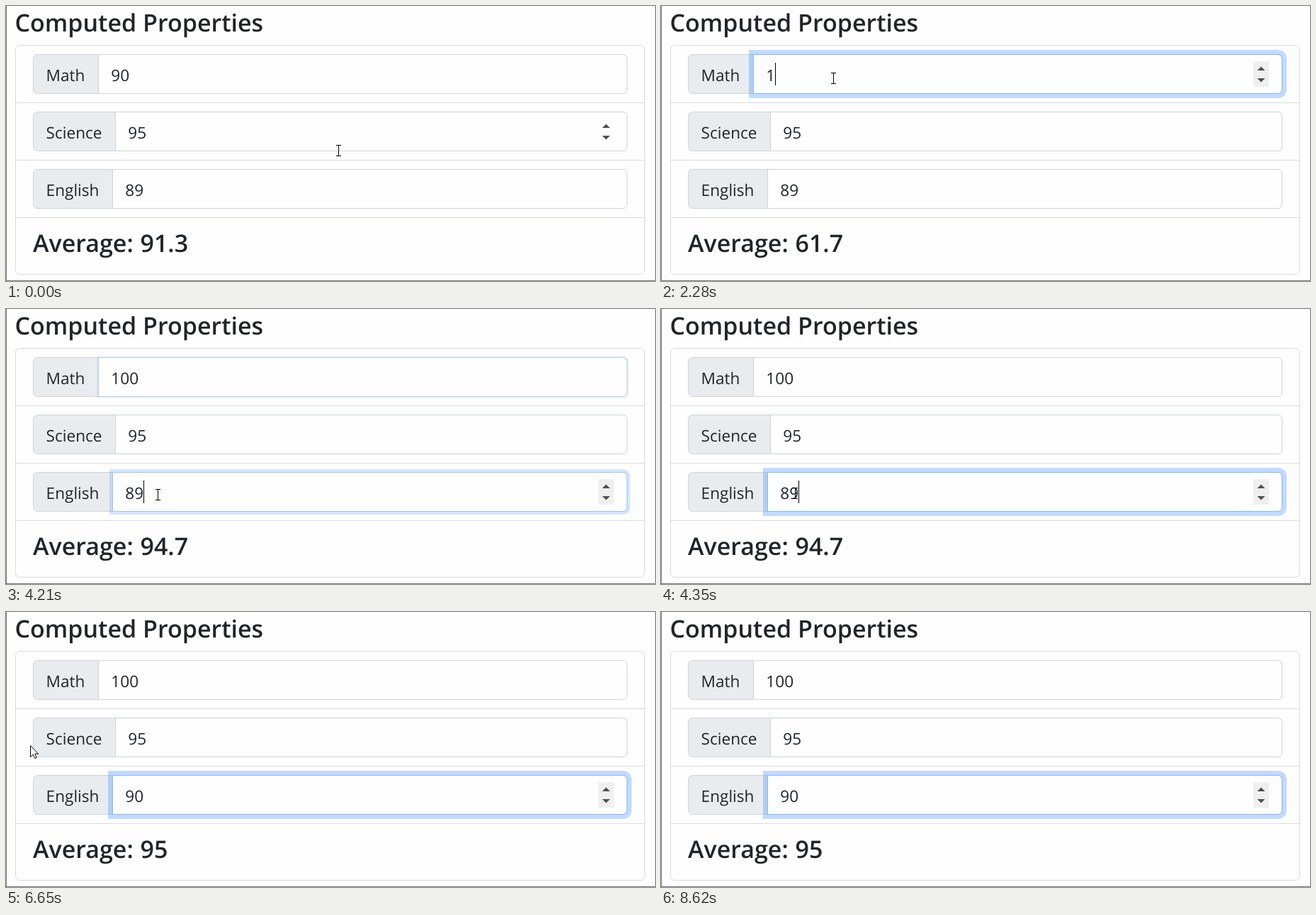
An HTML page that plays this animation: 916 px wide and 388 px high, repeating every 8740 ms.

```html
<!DOCTYPE html>
<html lang="en">
<head>
<meta charset="utf-8">
<title>Computed Properties</title>
<style>
  html, body { margin: 0; width: 100%; height: 100%; overflow: hidden; background: #fefefe; }
  svg { display: block; }
  text { font: 400 22.6px "Open Sans", "Noto Sans", sans-serif; fill: #212529; text-rendering: geometricPrecision; }
  .heading { font-size: 34px; font-weight: 600; }
  .line { fill: none; stroke: #dadada; }
  .addon { fill: #e9ecef; stroke: #ced4da; }
  .input { fill: #fefefe; stroke: #ced4da; }
  .active { fill: none; stroke: #86b7fe; }
  .ring { fill: #0d6efd; }
  .selection { fill: #3067d6; }
  .spin { fill: #efefef; }
  .arrows { fill: #505050; }
  .caret, .spin, #beam { shape-rendering: crispEdges; }
  #beam { fill: none; stroke: #000; }
  #pointer { fill: #fff; stroke: #000; }
</style>
</head>
<body>
<svg width="916" height="388" viewBox="0 0 916 388">
  <path d="M.5 0V388M0 387.5H916" stroke="#777"/>
  <text class="heading" x="12.5" y="36">Computed Properties</text>
  <rect class="line" x="13.5" y="55.5" width="888" height="323" rx="6"/>
  <path class="line" d="M14 136.5H901M14 217.5H901M14 298.5H901"/>
  <g id="fields"></g>
  <text class="heading" x="38" y="347">Average:</text>
  <text class="heading" id="average" x="189.5" y="347"></text>
  <path id="beam" d="M-3 -7.5H4M.5 -7V7M-3 7.5H4"/>
  <path id="pointer" d="M.5 .7V16.6L4.2 13.1 6.7 18.5 9.1 17.4 6.7 12.1H11.6Z"/>
</svg>
<script>
const LOOP = 8740, STEP = 120, BLINK = 490, TRANSITION = 150;
const RIGHT = 877, HEIGHT = 56, DIGIT = 12.94, PADDING = 18.3;
const byId = id => document.getElementById(id);

const cursorStart = { x: 469, y: 204 };
const moves = [
  { at: 120, steps: 3, x: 421, y: 138 },
  { at: 500, steps: 6, x: 243, y: 102 },
  { at: 3190, steps: 7, x: 214, y: 262 },
  { at: 4350, steps: 2, x: 163, y: 258, drag: true },
  { at: 4630, steps: 5, x: 34, y: 188, drag: true },
  { at: 7160, steps: 8, x: 598, y: 331 },
  { at: 8140, steps: 5, x: 920, y: 400 }
];

// Typing starts by replacing a selection; keys holds the time of each typed digit.
const fields = [
  { label: "Math", left: 130, initial: "90", typed: "100",
    focus: 980, blur: 4110, select: 2150, keys: [2280, 2560, 2690] },
  { label: "Science", left: 154, initial: "95", typed: "",
    focus: Infinity, blur: Infinity, select: Infinity, keys: [] },
  { label: "English", left: 150, initial: "89", typed: "90",
    focus: 4110, blur: Infinity, select: 4480, keys: [5900, 6150] }
];

const ramp = elapsed => Math.max(0, Math.min(1, elapsed / TRANSITION));
const show = (el, on) => el.setAttribute("visibility", on ? "visible" : "hidden");

// Box with square left corners and rounded right corners, grown by a margin.
function inputShape({ left, top }, grow, radius) {
  const x = left - grow, y = top - grow;
  const right = RIGHT + grow, bottom = top + HEIGHT + grow;
  return `M${x} ${y}H${right - radius}a${radius} ${radius} 0 0 1 ${radius} ${radius}` +
    `V${bottom - radius}a${radius} ${radius} 0 0 1 ${-radius} ${radius}H${x}Z`;
}

function addonShape({ left, top }) {
  return `M${left + .5} ${top + .5}H44.5a6 6 0 0 0 -6 6v43a6 6 0 0 0 6 6H${left + .5}Z`;
}

function add(tag, className, attributes) {
  const el = document.createElementNS("http://www.w3.org/2000/svg", tag);
  el.setAttribute("class", className);
  for (const name in attributes) el.setAttribute(name, attributes[name]);
  return byId("fields").appendChild(el);
}

function build(field, index) {
  const { left } = field;
  const top = field.top = 68 + 81 * index;
  const border = inputShape(field, -.5, 5.5);
  add("path", "addon", { d: addonShape(field) });
  add("text", "", { x: 56.6, y: top + 38 }).textContent = field.label;
  field.ring = add("path", "ring", {});
  add("path", "input", { d: border });
  field.active = add("path", "active", { d: border });
  field.selection = add("rect", "selection", { x: left + 19, y: top + 10, width: 25, height: 36 });
  field.text = add("text", "", { x: left + PADDING, y: top + 38 });
  field.caret = add("rect", "caret", { y: top + 12, width: 1, height: 32 });
  field.spin = add("rect", "spin", { x: 836, y: top + 10, width: 22, height: 36 });
  field.arrows = add("path", "arrows", {
    d: `M841.5 ${top + 23}l5.5 -5.5 5.5 5.5zM841.5 ${top + 34}l5.5 5.5 5.5 -5.5z`
  });
}

function drawField(field, t, hovered) {
  const { focus, blur, select, keys } = field;
  const pressed = keys.filter(time => time <= t);
  const value = field.typed.slice(0, pressed.length) || field.initial;
  const glow = ramp(t - focus) - ramp(t - blur);
  const focused = t >= focus && t < blur;
  const selected = t >= select && !pressed.length;
  const sinceAction = t - (pressed.at(-1) ?? focus);
  const caretOn = Math.floor(sinceAction / BLINK) % 2 === 0;

  field.ring.setAttribute("d", inputShape(field, 6 * glow, 6 + 6 * glow));
  field.ring.setAttribute("opacity", .25 * glow);
  field.active.setAttribute("opacity", glow);
  field.text.textContent = value;
  field.text.style.fill = selected ? "#fff" : "";
  field.caret.setAttribute("x", Math.floor(field.left + PADDING + value.length * DIGIT));
  show(field.selection, selected);
  show(field.caret, focused && caretOn && !selected);
  show(field.spin, focused);
  show(field.arrows, focused || hovered);
  return Number(value);
}

// The cursor advances in equal jumps, the first one at the start of a move.
function cursorAt(t) {
  let { x, y } = cursorStart, dragging = false;
  for (const move of moves) {
    if (t < move.at) break;
    const done = Math.min(1, (Math.floor((t - move.at) / STEP) + 1) / move.steps);
    x += (move.x - x) * done;
    y += (move.y - y) * done;
    dragging = move.drag && x > move.x || move.drag && t < move.at + STEP * move.steps && x > 38;
  }
  return { x: Math.round(x), y: Math.round(y), dragging };
}

function draw(t) {
  const { x, y, dragging } = cursorAt(t);
  let overInput = false, total = 0;

  for (const field of fields) {
    const hovered = x >= field.left && x < RIGHT && y >= field.top && y < field.top + HEIGHT;
    overInput ||= hovered;
    total += drawField(field, t, hovered);
  }
  byId("average").textContent = Number((total / fields.length).toFixed(1));

  const beam = overInput || Boolean(dragging);
  show(byId("beam"), beam);
  show(byId("pointer"), !beam);
  for (const id of ["beam", "pointer"]) {
    byId(id).setAttribute("transform", `translate(${x} ${y})`);
  }
}

function tick() {
  draw(performance.now() % LOOP);
  requestAnimationFrame(tick);
}

fields.forEach(build);
tick();
</script>
</body>
</html>
```
